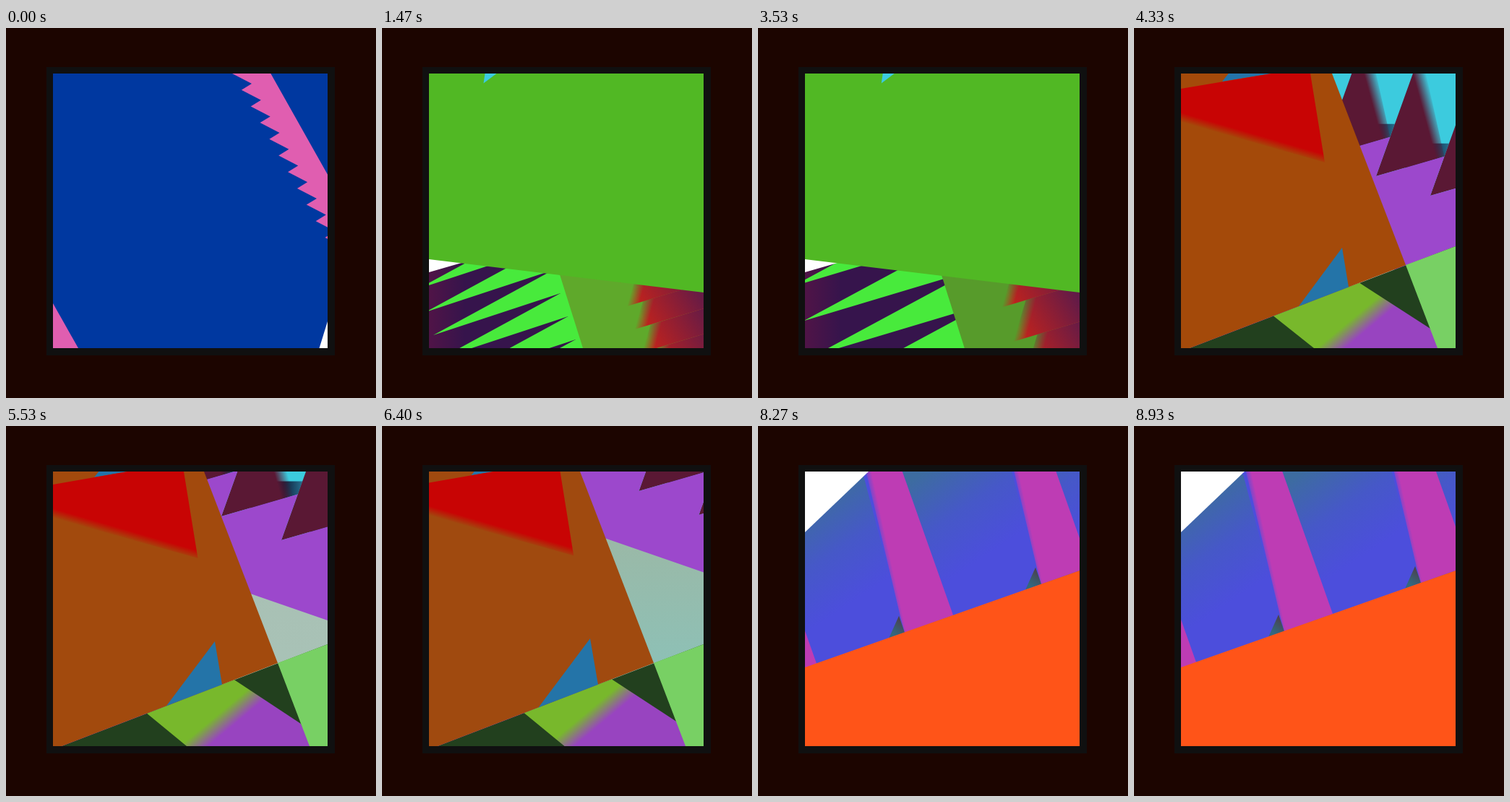
Recreate the animation shown at these times as an HTML page with a canvas. Size 512 by 512 pixels, loop 8.99 s.

```html
<!DOCTYPE html>
<html lang="en">
<head>
<meta charset="utf-8">
<title>Shifting planes</title>
<style>
html, body { margin: 0; width: 100%; height: 100%; overflow: hidden; background: #1c0500; }
canvas { display: block; width: 512px; height: 512px; }
</style>
</head>
<body>
<canvas id="stage" width="512" height="512"></canvas>
<script>
const ctx = document.getElementById('stage').getContext('2d');
const LOOP = 8990;

function poly(fill, ...points) {
  ctx.beginPath();
  points.forEach(p => ctx.lineTo(p[0], p[1]));
  ctx.closePath();
  ctx.fillStyle = fill;
  ctx.fill();
}

function gradient(x0, y0, x1, y1, ...stops) {
  const g = ctx.createLinearGradient(x0, y0, x1, y1);
  stops.forEach((c, i) => g.addColorStop(i / (stops.length - 1), c));
  return g;
}

const rgb = (r, g, b) => `rgb(${Math.round(r)},${Math.round(g)},${Math.round(b)})`;

function fillAll(color) {
  ctx.fillStyle = color;
  ctx.fillRect(65, 63, 380, 380);
}

// Piecewise linear tracks; the end segments continue beyond the table.
function track(times, t) {
  let i = 0;
  while (i < times.length - 2 && t > times[i + 1]) i++;
  const u = (t - times[i]) / (times[i + 1] - times[i]);
  return (...v) => v[i] + (v[i + 1] - v[i]) * u;
}

function blueScene(t) {
  fillAll('#0038a0');
  const pink = '#e05eb0', slide = t / 1000 * 0.35;
  const edge = [];
  for (let k = -3; k < 13; k++) {
    const x = 313 + 12.85 * (k - slide), y = 63 + 22.7 * (k - slide);
    edge.push([x, y], [x + 27, y + 14]);
  }
  poly(pink, ...edge, [501, 302], [332.5, 3]);
  poly(pink, [65, 381], [100, 443], [65, 443]);
  poly('#fff', [445, 406], [445, 443], [433.5, 443]);
}

function greenScene(t) {
  const at = track([1470, 2800], t);
  fillAll('#36144c');
  fillAll(gradient(65, 0, 115, 0, 'rgba(140,20,60,.3)', 'rgba(140,20,60,0)'));

  const tip = [at(247, 290), at(367, 377)], valley = [at(71, 76), at(425, 443)];
  const step = [at(10.5, 14), at(32, 42)];
  const shift = (p, k) => [p[0] + step[0] * k, p[1] + step[1] * k];
  const zigzag = [];
  for (let k = -7; k < 7; k++) zigzag.push(shift(valley, k), shift(tip, k));
  poly('#48ea3c', ...zigzag, [700, 600], [700, 0]);

  const seam = at(246, 251);
  poly(rgb(at(95, 90), at(169, 160), 43), [seam - 13, 300], [460, 300], [460, 443], [seam + 32, 443]);

  const rise = (step[1] + 0.3 * step[0]) / 0.91;
  for (let k = -1; k < 4; k++) {
    const [x, y] = shift([at(339, 338), at(385, 386)], k);
    const tooth = [[x, y], [x + 0.3 * rise, y - rise], [x + 200, y - step[1] - 0.3 * (200 + step[0])], [x + 200, y - 60]];
    poly(gradient(x, y, x + 15, y + 4, 'rgba(196,38,28,0)', 'rgb(190,34,30)'), ...tooth);
    poly(gradient(x + 20, y, x + 98, y - 48, 'rgba(92,26,74,0)', 'rgba(92,26,74,.95)'), ...tooth);
  }

  poly('#fff', [65, 315], [110, 325], [65, 338]);
  poly('#51b824', [65, 63], [445, 63], [445, 366], [65, 320]);
  const x = at(142.5, 162);
  poly('#3ccbe0', [x, 63], [x + 16, 63], [x - 2, 76.5]);
}

function spikes(at) {
  const step = [at(75, 83, 83), at(27, 33, 33)];
  // Each base runs until it meets the flank of the next spike.
  const width = (step[0] + 0.36 * step[1]) / (1 - 0.36 * 0.287);
  const bases = [];
  for (let k = -3; k < 5; k++) {
    const x = at(335, 298, 247) + step[0] * k, y = at(205, 125, -11) + step[1] * k;
    const apex = [x + 51, y - 142], end = [x + width, y - 0.287 * width];
    const top = end[1] - 18;
    poly(gradient(end[0] - 20, 0, end[0] + 12, 0, '#101c38', '#2a80a0'),
      [x + 40, top], [end[0] + 6.5, top], end, [x + 40, y - 11]);
    poly(gradient(apex[0], apex[1], apex[0] + 17, apex[1] - 4.6, '#5a1834', 'rgba(90,24,52,0)'),
      [x, y], apex, [apex[0] + 18, apex[1]], end);
    bases.push([x, y], end);
  }
  poly('#9c48cc', ...bases, [800, 700], [-100, 700]);
}

function brownScene(t) {
  const at = track([4330, 5530, 7270], t);
  fillAll('#3ccbde');
  spikes(at);

  const y = at(328, 233, 100);
  poly(gradient(0, 80, 0, 320,
      rgb(at(176, 170, 150), at(192, 190, 172), at(188, 178, 142)),
      rgb(at(176, 168, 116), at(194, 194, 190), at(186, 182, 180))),
    [240, y - 35], [445, y + 36], [445, 443], [240, 443]);

  const line = x => 443 - (x - 77) * 0.384;
  poly('#22401e', [77, 443], [445, 302], [445, 443]);
  const left = at(193, 195, 198), right = at(312, 316, 320);
  const cx = at(311, 301, 286), cy = at(411, 409, 399);
  poly(gradient(cx - 8, cy - 9.6, cx + 8, cy + 9.6, '#78b82c', '#9844c0'),
    [left, line(left)], [right, line(right)], [at(410, 408, 407), at(416, 412, 406)],
    [425, 443], [at(249, 250, 255), 443]);
  poly('#78d064', [376, 328], [445, 302], [445, 443], [420, 443]);

  poly(rgb(at(164, 162, 158), 74, at(10, 13, 16)),
    [65, 63], [274, 63], [376, 328], [77, 443], [65, 443]);

  const edge = at(84, 81, 76), end = at(190, 168, 140);
  const bx = at(122, 122, 125), by = at(74, 71, 65.5);
  poly('#2474aa', [bx, by], [bx + (by - 63) * 0.8, 63], [end, 63]);
  const low = at(130, 127, 120), tipX = at(264, 265.5, 265), tipY = at(186, 183, 176);
  poly(gradient(65, low - 13, 61.5, low - 1, '#c80404', 'rgba(200,4,4,0)'),
    [65, edge], [end, 63], [at(244, 246, 247), 63], [tipX, tipY], [65, low]);

  const foot = at(228, 222, 211), heel = at(297, 299, 299);
  poly('#2474a8', [at(288, 289, 287), at(304, 298, 290)], [heel, line(heel)], [foot, line(foot)]);
}

function orangeScene(t) {
  fillAll('#4c4edc');
  const slide = (t - 8930) / 1000 * 0.04;
  for (let k = -2; k < 4; k++) {
    const x = 275 + 189 * (k + slide), y = 260 - 67 * (k + slide);
    const top = [x - 92, y - 260], foot = [x - 67, y + 24];
    poly(gradient(x - 60, y - 185, x + 20, y - 65, '#3d6ca0', '#4658c8', '#4c4edc'),
      [x, y], top, [x + 65, y - 260], [x + 122, y - 43]);
    poly(gradient(x - 80, y + 28, x - 67, y + 10, 'rgba(45,110,105,.8)', 'rgba(75,65,70,.95)'),
      [x - 89, y + 32], [x - 75, y + 1], foot);
    poly(gradient(foot[0] - 9, foot[1], foot[0] + 2, foot[1] - 2.4, 'rgba(190,60,180,0)', '#be3cb4'),
      [x, y], top, [foot[0] - 68, y - 260], [foot[0] - 5, foot[1] - 18], foot);
  }
  poly('#fff', [65, 63], [153, 63], [65, 147]);
  poly('#ff5418', [65, 334], [445, 200], [445, 443], [65, 443]);
}

const scenes = [[7550, orangeScene], [4050, brownScene], [550, greenScene], [0, blueScene]];

function draw(t) {
  ctx.fillStyle = '#1c0500';
  ctx.fillRect(0, 0, 512, 512);
  ctx.fillStyle = '#101010';
  ctx.fillRect(56, 54, 399, 399);
  ctx.save();
  ctx.beginPath();
  ctx.rect(65, 63, 380, 380);
  ctx.clip();
  scenes.find(([start]) => t >= start)[1](t);
  ctx.restore();
}

const began = performance.now();
function tick() {
  draw((performance.now() - began) % LOOP);
  requestAnimationFrame(tick);
}
tick();
</script>
</body>
</html>
```
